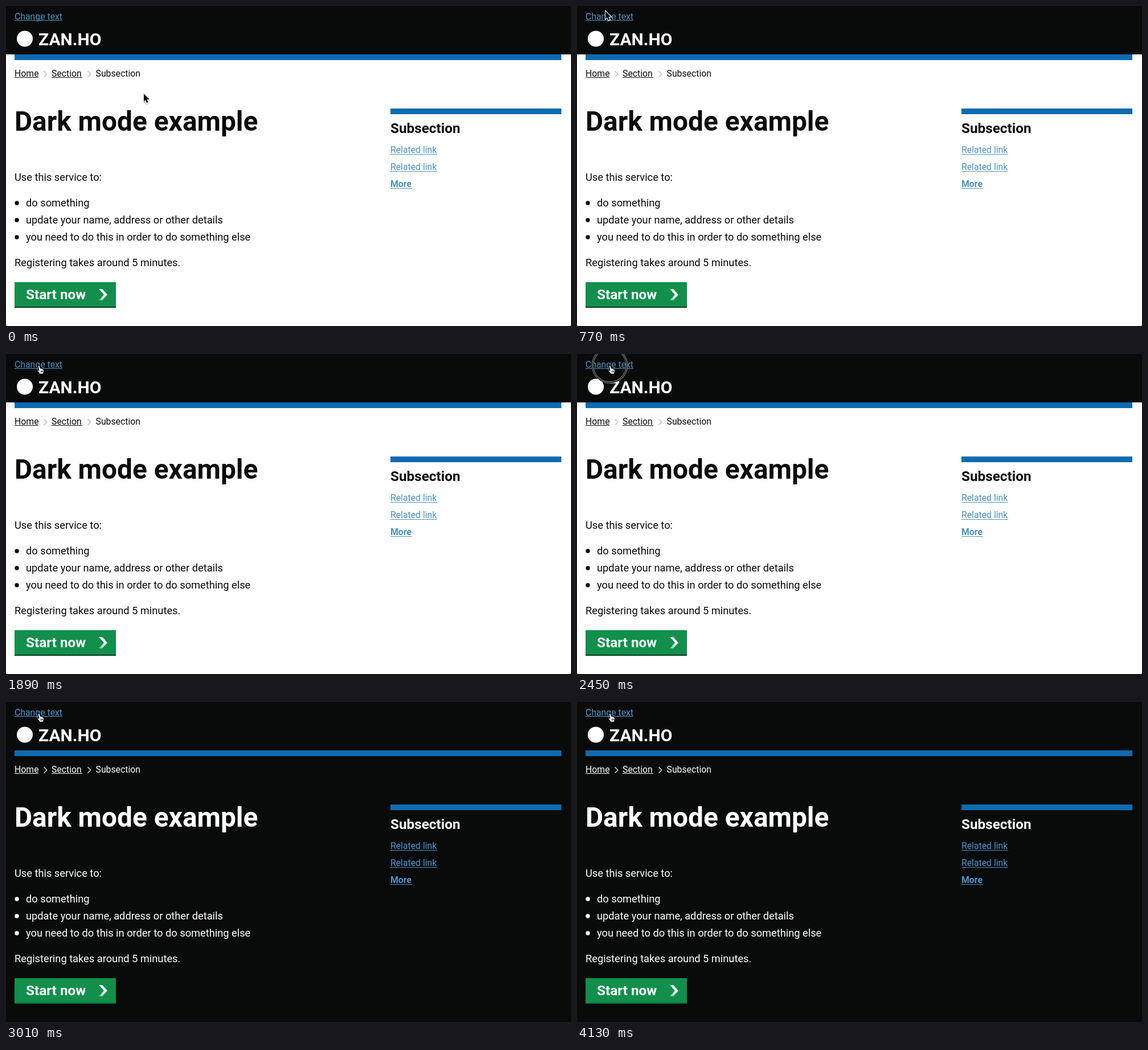
An HTML page for the animation above (4.2 s loop, 992 px wide and 562 px high).

```html
<!DOCTYPE html>
<html lang="en">
<head>
<meta charset="utf-8">
<title>Dark mode example</title>
<style>
  html, body { margin: 0; width: 100%; height: 100%; overflow: hidden; }
  svg {
    --page: #fff; --ink: #090a0a; --link: #4b91bf; --chevron: #bfc1c3; --edge: #08371d;
    display: block; width: 992px; height: 562px; background: var(--page);
    font: 15.8px Roboto, Arial, sans-serif;
  }
  svg.dark { --page: #090a0a; --ink: #fff; --link: #4b96cf; --chevron: #d5d6d7; --edge: #0b6a36; }
  text { fill: var(--ink); white-space: pre; }
  .body { font-size: 18.25px; }
  .bold { font-weight: 700; }
  .mid { font-size: 24.3px; }
  .title { font-size: 47.8px; }
  .logo { font-size: 30px; }
  .link { fill: var(--link); }
  .white { fill: #fff; }
  .line { fill: none; stroke: var(--ink); }
  .line.blue { stroke: var(--link); }
  .bar { fill: #0e6bb1; }
  .dark .corner { display: none; }
</style>
</head>
<body>
<svg id="stage" viewBox="0 0 992 562">
  <defs>
    <linearGradient id="fade" x1="0" y1="1" x2=".4" y2=".35">
      <stop stop-color="#6fbd92"/><stop offset="1" stop-color="#fff"/>
    </linearGradient>
  </defs>

  <rect width="992" height="85" fill="#090a0a"/>
  <text class="link" x="15" y="24">Change text</text>
  <circle cx="33" cy="57.5" r="14" fill="#fff"/>
  <text class="bold logo white" x="57" y="69">ZAN.HO</text>
  <rect class="bar" x="15" y="85" width="960" height="10"/>

  <text x="15" y="123.5">Home</text>
  <text x="80" y="123.5">Section</text>
  <text x="157.5" y="123.5">Subsection</text>
  <path d="M66.5 114.2l5.3 5.3-5.3 5.3M143.5 114.2l5.3 5.3-5.3 5.3" fill="none" stroke="var(--chevron)" stroke-width="1.5"/>
  <path class="line" d="M15 125.5H57M80 125.5H134"/>

  <text class="bold title" x="15" y="218.5">Dark mode example</text>
  <g class="body">
    <text x="15" y="307">Use this service to:</text>
    <text x="35" y="352">do something</text>
    <text x="35" y="382">update your name, address or other details</text>
    <text x="35" y="412">you need to do this in order to do something else</text>
    <text x="15" y="457">Registering takes around 5 minutes.</text>
  </g>
  <g fill="var(--ink)">
    <circle cx="19" cy="346" r="3.7"/><circle cx="19" cy="376" r="3.7"/><circle cx="19" cy="406" r="3.7"/>
  </g>

  <rect x="15" y="485" width="178" height="45" fill="var(--edge)"/>
  <rect x="15" y="485" width="178" height="43" fill="#118f4b"/>
  <text class="bold mid white" x="35" y="515">Start now</text>
  <path d="M163 497h6l9 10-9 10h-6l9-10z" fill="url(#fade)"/>

  <rect class="bar" x="675" y="180" width="300" height="10"/>
  <text class="bold mid" x="675" y="223">Subsection</text>
  <text class="link" x="675" y="258">Related link</text>
  <text class="link" x="675" y="288">Related link</text>
  <text class="link bold" x="675" y="318">More</text>
  <path class="line blue" d="M15 25.5H99M675 260.5H757M675 290.5H757M675 320.5H713"/>

  <path class="corner" d="M0 559q0 3 3 3H0zM992 559q0 3-3 3h3z" fill="#777"/>

  <g id="ring" fill="none">
    <circle stroke="#888" stroke-width="3.4"/>
    <circle stroke="#151515" stroke-width="1.4"/>
  </g>
  <path id="arrow" d="M0 0V13.8L3 10.9 5.2 16.1 7.6 15.1 5.4 10H9.6Z" fill="#000" stroke="#fff" stroke-width="2" paint-order="stroke"
    style="filter:drop-shadow(0 1px 1px #0006)"/>
  <g id="hand" stroke="#000" stroke-width=".9" stroke-linejoin="round">
    <path fill="#fff" d="M2.6 2.2C2.2.4 4.6-.2 5.2 1.6L6.4 5.6Q8 4.6 8.6 6 10 5.4 10.5 7 12 6.6 12.3 8.5 12.8 11 11 15H5.2Q4 12 1.2 9.8.4 8.2 2.6 8.6L4 9.2Z"/>
    <path fill="none" d="M6.6 9.6l.9 3M8.4 9.2l.8 3M10 8.8l.6 3"/>
  </g>
</svg>
<script>
  const LOOP = 4200, STEP = 70, HAND_AT = 1470, CLICK_AT = 2380, DARK_AT = 2520;
  // Pointer positions: time, x, y
  const path = [
    [0, 242, 154], [70, 236, 149], [490, 58, 14], [560, 52, 10], [770, 50, 9],
    [1120, 50, 6], [1190, 50, 3], [1400, 55.5, 19], [1680, 57, 20], [LOOP, 57, 20]
  ];
  const $ = id => document.getElementById(id);
  const show = (el, on) => el.style.display = on ? "" : "none";
  const move = (el, x, y) => el.setAttribute("transform", `translate(${x} ${y})`);

  function pointer(t) {
    const i = path.findIndex(p => p[0] > t);
    const [a, b] = [path[i - 1], path[i]];
    const k = (t - a[0]) / (b[0] - a[0]);
    const s = k * k * (3 - 2 * k);
    return [a[1] + (b[1] - a[1]) * s, a[2] + (b[2] - a[2]) * s];
  }

  function draw(now) {
    const t = Math.floor(now % LOOP / STEP) * STEP;
    const [x, y] = pointer(t);
    const clicking = t >= CLICK_AT && t < DARK_AT;
    $("stage").classList.toggle("dark", t >= DARK_AT);
    show($("arrow"), t < HAND_AT);
    show($("hand"), t >= HAND_AT);
    show($("ring"), clicking);
    move($("arrow"), x, y);
    move($("hand"), x - 3, y);
    move($("ring"), 57.5, 20);
    if (clicking) {
      const r = 17 + (t - CLICK_AT) / STEP * 13;
      for (const c of $("ring").children) c.setAttribute("r", r);
    }
  }

  const start = performance.now();
  function tick() {
    draw(performance.now() - start);
    requestAnimationFrame(tick);
  }
  tick();
</script>
</body>
</html>
```
